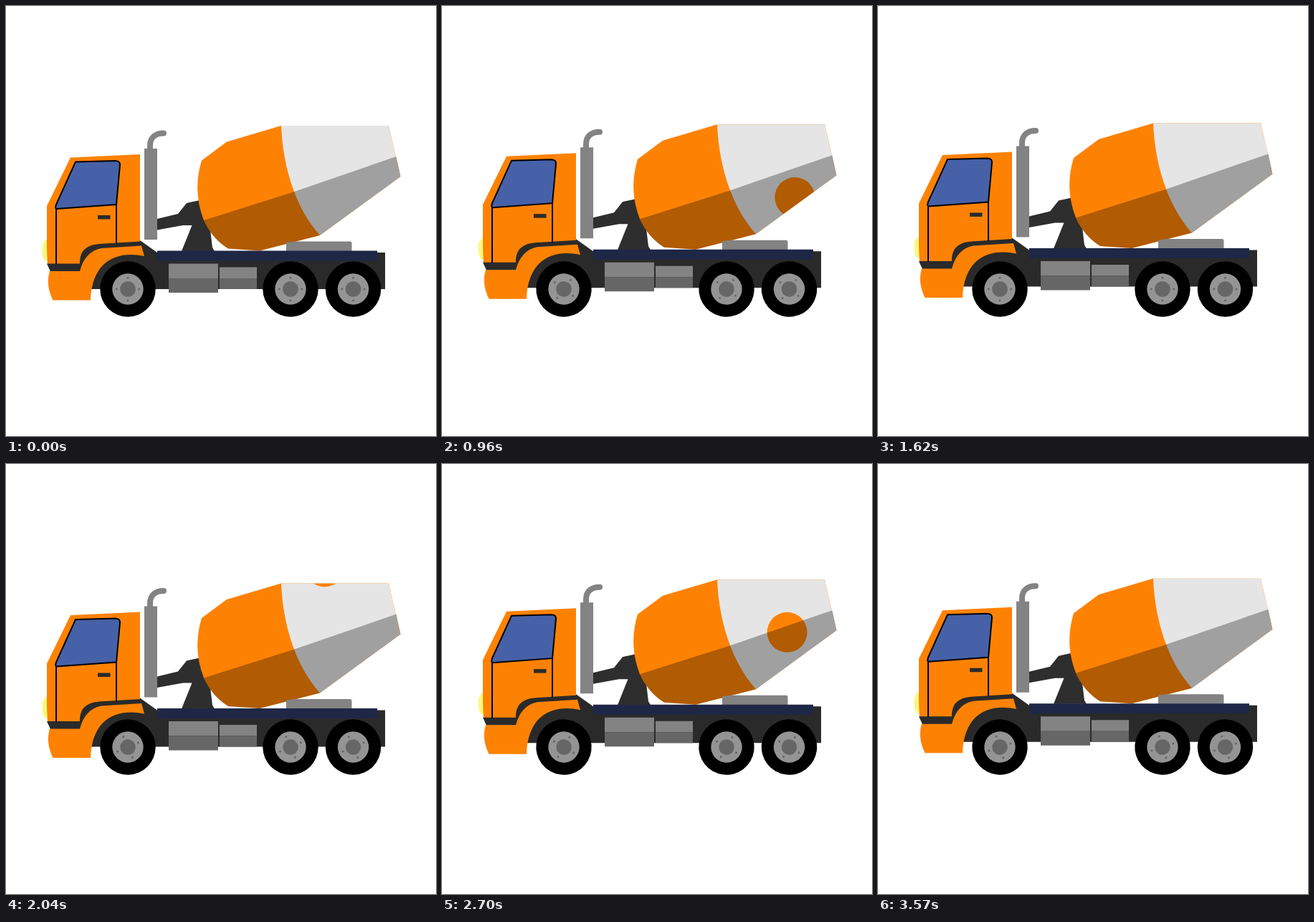
Write an HTML page that moves like this. It is 600x600 px and loops after 3.6 s.

```html
<!DOCTYPE html>
<html lang="en">
<head>
<meta charset="utf-8">
<title>Mixer truck</title>
<style>
  html, body { margin: 0; width: 100%; height: 100%; overflow: hidden; background: #fff; }
  svg { display: block; width: 100vw; height: 100vh; }
</style>
</head>
<body>
<svg viewBox="0 0 600 600" xmlns="http://www.w3.org/2000/svg">
  <defs>
    <path id="cone" d="M384 167H534L550.5 238L438 320C402 280 386 220 384 167Z"/>
    <clipPath id="coneClip"><use href="#cone"/></clipPath>
    <g id="wheel">
      <circle r="38.7"/>
      <circle r="21.7" fill="#949494"/>
      <circle r="10.8" fill="#666"/>
      <g fill="#666">
        <circle cy="-15.7" r="1.5"/><circle cx="15.7" r="1.5"/>
        <circle cy="15.7" r="1.5"/><circle cx="-15.7" r="1.5"/>
      </g>
    </g>
  </defs>

  <g id="body">
    <!-- drum support -->
    <path fill="#2e2e2e" d="M211 297L240 290L252 275L275 270L285 312L288 337L291 342H245L259.500 306H247L211 312.500Z"/>

    <!-- drum -->
    <path fill="#fd8204" d="M384 167L308 189.500L273 215.500Q260 258 276 299Q288 325 310 338.500L354 341.500L438 320L550.500 238L534 167Z"/>
    <use href="#cone" fill="#e5e5e5"/>
    <g clip-path="url(#coneClip)"><circle id="badge" r="28" fill="#fd8204"/></g>
    <path fill-opacity=".3" d="M276 299L401 259.500L544.500 210L550.500 238L438 320L354 341.500L310 338.500Q288 325 276 299Z"/>

    <!-- chassis -->
    <path fill="#2a2a2a" d="M119 395V370L150 344H187V327L211 344H529V395Z"/>
    <path fill="#838383" d="M391 342V331Q391 329.500 394 329.500L404 328.500H480Q482.500 328.500 482.500 331V342Z"/>
    <path fill="#1e2746" d="M211 341.500H518V355.500H211Z"/>
    <path fill="#838383" d="M227 359.500H296V380H227ZM298 364.500H350V380H298Z"/>
    <path fill="#666" d="M227 380H296V400H227ZM298 380H350V395H298Z"/>

    <!-- exhaust -->
    <path fill="#838383" d="M193 199H211V326H193Z"/>
    <path fill="none" stroke="#838383" stroke-width="8" stroke-linecap="round" d="M201 201V195C201 183 209 177.500 220 177.500"/>

    <!-- cab -->
    <path fill="#fff87a" d="M58 325.500Q50 327 50.700 341Q50.700 355 58 355.500Z"/>
    <path fill="#fd8204" d="M90 211.500L187 207V332L104 362H58L57 340V279Z"/>
    <path fill="#2a2a2a" d="M57 359.500H103C103 343 110 334 130 332L187 328.500L194 338L140 345L103 370.500H62Z"/>
    <path fill="#fd8204" d="M61 370H103C108 352 117 341 133 338L189 334.500L193 349C155 341 120 355 118 410.500H65.500Q55 389 61 370Z"/>
    <g stroke="#000" stroke-width="2">
      <path fill="#4661a8" d="M97 217.500L152 216Q159.500 216 159 222L154 277L71 283Q68 283 70 277Z"/>
      <path fill="none" d="M70 282V360M154 276V331"/>
    </g>
    <path fill="#2a2a2a" d="M128 292H145.500V297.500H128Z"/>
  </g>

  <g id="wheels">
    <use href="#wheel"/><use href="#wheel"/><use href="#wheel"/>
  </g>
</svg>
<script>
const LOOP = 3600, STEP = 30;
const BOUNCE = 183.4, LIFT = 7.5;
const DRUM = 1932;
const WHEEL_X = [170, 397, 484.5], WHEEL_Y = 395;

const body = document.getElementById('body');
const badge = document.getElementById('badge');
const wheels = [...document.querySelectorAll('#wheels use')];

// cubic-bezier(.6, 0, .8, 1)
function ease(x) {
  let lo = 0, hi = 1;
  for (let i = 0; i < 24; i++) {
    const s = (lo + hi) / 2, r = 1 - s;
    const bx = 1.8 * r * r * s + 2.4 * r * s * s + s * s * s;
    if (bx < x) lo = s; else hi = s;
  }
  return 3 * (1 - lo) * lo * lo + lo * lo * lo;
}

function lift(t) {
  const p = t % BOUNCE / BOUNCE * 2;
  return LIFT * (p < 1 ? ease(p) : 1 - ease(p - 1));
}

function draw(t) {
  body.setAttribute('transform', `translate(0 ${-lift(t)})`);
  const d = t % DRUM;
  badge.setAttribute('cx', 438.5 + d * 0.0561);
  badge.setAttribute('cy', 128 + d * 0.1468);
  wheels.forEach((w, i) =>
    w.setAttribute('transform', `translate(${WHEEL_X[i]} ${WHEEL_Y}) rotate(${-t / 18})`));
}

const start = performance.now();
function tick() {
  const t = (performance.now() - start) % LOOP;
  draw(Math.floor(t / STEP) * STEP);
  requestAnimationFrame(tick);
}
draw(0);
requestAnimationFrame(tick);
</script>
</body>
</html>
```
